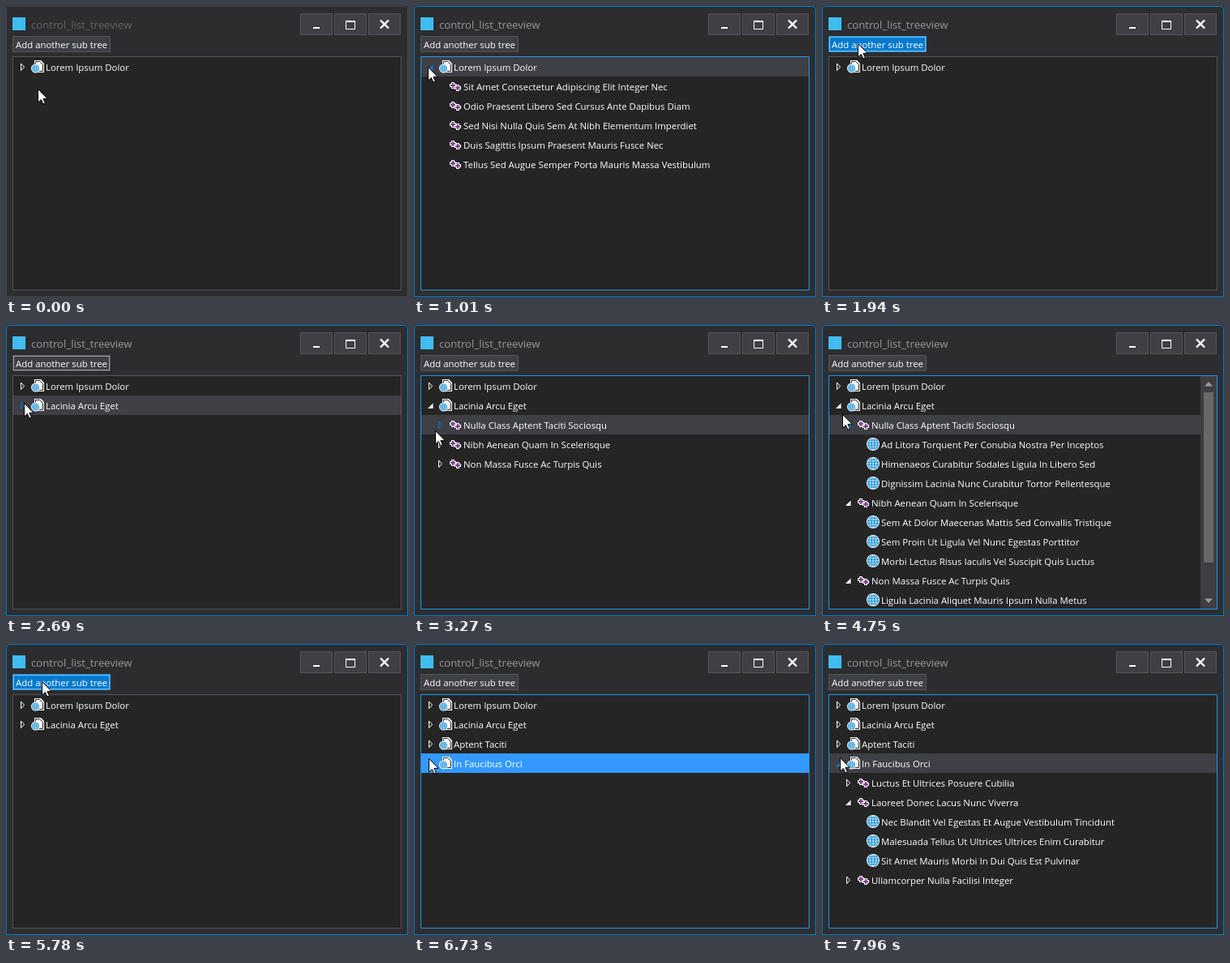
An HTML page with a canvas for the animation above (8000 ms loop, 496 by 359 pixels).

```html
<!DOCTYPE html>
<html lang="en">
<head>
<meta charset="utf-8">
<title>control_list_treeview</title>
<style>
  html, body { margin: 0; width: 100%; height: 100%; overflow: hidden; background: #2d2d30; }
  canvas { display: block; width: 496px; height: 359px; }
</style>
</head>
<body>
<canvas id="stage" width="496" height="359"></canvas>
<script>
const ctx = document.getElementById('stage').getContext('2d');
const LOOP = 8000, TRAVEL = 350, HOLD = 100;
const ROW = 24, INDENT = 12, BAR = 20;
const list = { left: 9, top: 63, right: 487, bottom: 350 };
const button = { x: 8, y: 37, w: 121, h: 20 };
const FONT = '"Open Sans", "Noto Sans", sans-serif', SMALL = 11.4, LARGE = 13.2;
const WINDOW = '#2d2d30', DARK = '#252526', FACE = '#3f3f46', EDGE = '#555559', ACCENT = '#007acc',
      FOCUS = '#1c97ea', PRESSED = '#3399ff', GLOBE = '#0a8bd6', PURPLE = '#7b3f8c', WHITE = '#fff';

const node = (label, kids = []) => ({ label, kids });
const group = (label, ...names) => node(label, names.map(name => node(name)));

const tree = [
  group('Lorem Ipsum Dolor',
    'Sit Amet Consectetur Adipiscing Elit Integer Nec',
    'Odio Praesent Libero Sed Cursus Ante Dapibus Diam',
    'Sed Nisi Nulla Quis Sem At Nibh Elementum Imperdiet',
    'Duis Sagittis Ipsum Praesent Mauris Fusce Nec',
    'Tellus Sed Augue Semper Porta Mauris Massa Vestibulum'),
  node('Lacinia Arcu Eget', [
    group('Nulla Class Aptent Taciti Sociosqu',
      'Ad Litora Torquent Per Conubia Nostra Per Inceptos',
      'Himenaeos Curabitur Sodales Ligula In Libero Sed',
      'Dignissim Lacinia Nunc Curabitur Tortor Pellentesque'),
    group('Nibh Aenean Quam In Scelerisque',
      'Sem At Dolor Maecenas Mattis Sed Convallis Tristique',
      'Sem Proin Ut Ligula Vel Nunc Egestas Porttitor',
      'Morbi Lectus Risus Iaculis Vel Suscipit Quis Luctus'),
    group('Non Massa Fusce Ac Turpis Quis',
      'Ligula Lacinia Aliquet Mauris Ipsum Nulla Metus',
      'Metus Ullamcorper Vel Tincidunt Sed Euismod In',
      'Nibh Quisque Volutpat Condimentum Velit Class')
  ]),
  group('Aptent Taciti', ''),
  node('In Faucibus Orci', [
    group('Luctus Et Ultrices Posuere Cubilia', ''),
    group('Laoreet Donec Lacus Nunc Viverra',
      'Nec Blandit Vel Egestas Et Augue Vestibulum Tincidunt',
      'Malesuada Tellus Ut Ultrices Ultrices Enim Curabitur',
      'Sit Amet Mauris Morbi In Dui Quis Est Pulvinar'),
    group('Ullamcorper Nulla Facilisi Integer', '')
  ])
];

// The user's session: the cursor travels to a spot, then clicks there.
const home = { x: 40, y: 103 };
const moves = [], clicks = [];
let spot = home, idleFrom = 0;

function go(arrive, x, y) {
  spot = { x, y, arrive, depart: Math.max(arrive - TRAVEL, idleFrom) };
  moves.push(spot);
  return { click };
}

function click(...times) {
  for (const time of times) clicks.push({ time, x: spot.x, y: spot.y });
  idleFrom = times[times.length - 1] + HOLD;
}

go(440, 18, 76).click(760, 1380);
go(1750, 45, 47).click(1940);
go(2690, 23, 97).click(2870);
go(3450, 31, 168).click(3490);
go(3780, 30, 145).click(4040);
go(4440, 30, 121).click(4480);
go(4950, 20, 97).click(5220);
go(5550, 45, 47).click(5780, 6190);
go(6650, 19, 142).click(6730);
go(7300, 31, 193).click(7380);
go(7820, 23, 141);

function cursorAt(t) {
  let { x, y } = home;
  for (const m of moves) {
    if (t <= m.depart) break;
    const u = Math.min(1, (t - m.depart) / (m.arrive - m.depart));
    const ease = u * u * (3 - 2 * u);
    x += (m.x - x) * ease;
    y += (m.y - y) * ease;
  }
  return { x: Math.round(x), y: Math.round(y) };
}

const overButton = p => p.x >= button.x && p.x < button.x + button.w &&
  p.y >= button.y && p.y < button.y + button.h;
const rowAt = p => p.y < list.top ? -1 : Math.floor((p.y - list.top) / ROW);

function visibleRows(nodes, open, level = 0) {
  return nodes.flatMap(n => [{ n, level, open: open.has(n) },
    ...(open.has(n) ? visibleRows(n.kids, open, level + 1) : [])]);
}

// Replays every click up to time t.
function stateAt(t) {
  const open = new Set();
  const state = { active: false, down: false, buttonFocus: false };
  let shown = 1;
  const rows = () => visibleRows(tree.slice(0, shown), open);
  for (const c of clicks) {
    if (t < c.time) break;
    state.active = true;
    state.buttonFocus = overButton(c);
    state.down = t < c.time + HOLD;
    if (state.down) break;
    if (state.buttonFocus) shown++;
    else {
      const { n } = rows()[rowAt(c)];
      if (!open.delete(n)) open.add(n);
    }
  }
  return { ...state, rows: rows() };
}

function rect(x, y, w, h, fill) {
  ctx.fillStyle = fill;
  ctx.fillRect(x, y, w, h);
}

function frame(x, y, w, h, color, radius = 0) {
  ctx.beginPath();
  ctx.roundRect(x + .5, y + .5, w - 1, h - 1, radius);
  ctx.strokeStyle = color;
  ctx.lineWidth = 1;
  ctx.stroke();
}

function box(x, y, w, h, fill, edge) {
  rect(x, y, w, h, fill);
  frame(x, y, w, h, edge);
}

function poly(points, fill, stroke) {
  ctx.beginPath();
  for (let i = 0; i < points.length; i += 2) ctx.lineTo(points[i], points[i + 1]);
  ctx.closePath();
  if (fill) { ctx.fillStyle = fill; ctx.fill(); }
  if (stroke) { ctx.strokeStyle = stroke; ctx.lineWidth = 1; ctx.stroke(); }
}

function line(x0, y0, x1, y1, width) {
  ctx.beginPath();
  ctx.moveTo(x0, y0);
  ctx.lineTo(x1, y1);
  ctx.strokeStyle = WHITE;
  ctx.lineWidth = width;
  ctx.stroke();
}

function disc(x, y, r, fill) {
  ctx.beginPath();
  ctx.arc(x, y, r, 0, 7);
  ctx.fillStyle = fill;
  ctx.fill();
}

function text(s, x, y, size, color) {
  ctx.font = `${size}px ${FONT}`;
  ctx.fillStyle = color;
  ctx.fillText(s, x, y);
}

function globe(x, y, r) {
  const inner = r - 1, thin = r * .09;
  disc(x, y, r, WHITE);
  disc(x, y, inner, GLOBE);
  line(x, y - inner, x, y + inner, thin);
  for (const lat of [-.45, 0, .45]) {
    const half = inner * Math.sqrt(1 - lat * lat);
    line(x - half, y + lat * inner, x + half, y + lat * inner, thin);
  }
  ctx.beginPath();
  ctx.ellipse(x, y, inner * .55, inner, 0, 0, 7);
  ctx.stroke();
}

function page(x, y, w, h, fold, fill, stroke) {
  poly([x, y, x + w - fold, y, x + w, y + fold, x + w, y + h, x, y + h], fill, stroke);
}

function pageIcon(x, y) {
  page(x + 4, y, 12, 15, 4, WHITE);
  page(x + 5.5, y + 1.5, 9, 12, 4, WHITE, DARK);
  globe(x + 5.5, y + 10, 5.5);
}

function plus(x, y) {
  for (const [long, wide, color] of [[8, 4, WHITE], [6, 2, PURPLE]]) {
    rect(x - long / 2, y - wide / 2, long, wide, color);
    rect(x - wide / 2, y - long / 2, wide, long, color);
  }
}

function classIcon(x, y) {
  plus(x + 5, y + 5);
  plus(x + 11, y + 8);
}

function expander(x, y, open, color) {
  if (open) poly([x - 1, y + 16, x + 5.5, y + 16, x + 5.5, y + 9.5], color);
  else poly([x + .5, y + 8, x + .5, y + 16.6, x + 4.6, y + 12.3], null, color);
}

function drawRow({ n, level, open }, y, right, hover, down, x) {
  const dx = INDENT * level;
  if (hover) rect(list.left, y, right - list.left, ROW, down ? PRESSED : FACE);
  if (n.kids.length) {
    const hot = hover && Math.abs(x - 20 - dx) < 9;
    expander(18 + dx, y, open, hot ? ACCENT : WHITE);
  }
  if (level === 0) pageIcon(31, y + 4);
  else if (level === 1) classIcon(43, y + 6);
  else globe(63, y + 12, 8);
  text(n.label, 49 + dx, y + 17, SMALL, WHITE);
}

function scrollBar() {
  const x = list.right - BAR, mid = x + BAR / 2;
  const arrow = (base, tip) => poly([mid - 5, base, mid + 5, base, mid, tip], '#999');
  rect(x, list.top, BAR, list.bottom - list.top, '#3e3e42');
  rect(x + 4, list.top + BAR, 12, 210, '#686868');
  arrow(list.top + 12.5, list.top + 7);
  arrow(list.bottom - 12.5, list.bottom - 7);
}

function titleBar(active) {
  rect(8, 14, 16, 16, '#3fbdf1');
  text('control_list_treeview', 31, 28, LARGE, active ? '#999' : '#666');
  for (let i = 0; i < 3; i++) box(363 + 42 * i, 9, 40, 27, FACE, EDGE);
  rect(379, 26, 8, 2, WHITE);
  frame(419, 18, 12, 11, WHITE);
  rect(419, 18, 12, 2, WHITE);
  line(462, 17.5, 472, 27.5, 2.4);
  line(472, 17.5, 462, 27.5, 2.4);
}

function pushButton(hover, down, focused) {
  const { x, y, w, h } = button;
  const [fill, edge] = !hover ? [FACE, EDGE] : down ? [ACCENT, FOCUS] : ['#54545c', '#6a6a75'];
  box(x, y, w, h, fill, edge);
  text('Add another sub tree', x + 4, y + 15, SMALL, WHITE);
  if (!focused) return;
  ctx.setLineDash([1, 1]);
  frame(x + 1, y + 1, w - 2, h - 2, WHITE);
  ctx.setLineDash([]);
}

function pointer({ x, y }) {
  ctx.save();
  ctx.translate(x - .5, y - .5);
  poly([0, 0, 0, 16.5, 3.8, 13, 6.4, 18.6, 8.9, 17.5, 6.4, 12, 11.5, 11.8], WHITE, '#000');
  ctx.restore();
}

function draw(t) {
  const cursor = cursorAt(t);
  const { rows, active, down, buttonFocus } = stateAt(t);
  const { left, top, right, bottom } = list;
  const scrolls = rows.length * ROW > bottom - top;
  const hovered = rowAt(cursor);

  rect(0, 0, 496, 359, WINDOW);
  titleBar(active);
  pushButton(overButton(cursor), down, buttonFocus);
  box(left - 1, top - 1, right - left + 2, bottom - top + 2, DARK,
    active && !buttonFocus ? FOCUS : EDGE);

  ctx.save();
  ctx.beginPath();
  ctx.rect(left, top, right - left, bottom - top);
  ctx.clip();
  rows.forEach((row, i) =>
    drawRow(row, top + i * ROW, scrolls ? right - BAR : right, i === hovered, down, cursor.x));
  if (scrolls) scrollBar();
  ctx.restore();

  frame(0, 0, 496, 359, active ? ACCENT : '#434346', [4, 4, 0, 0]);
  pointer(cursor);
}

const start = performance.now();
function tick() {
  draw((performance.now() - start) % LOOP);
  requestAnimationFrame(tick);
}
tick();
</script>
</body>
</html>
```
